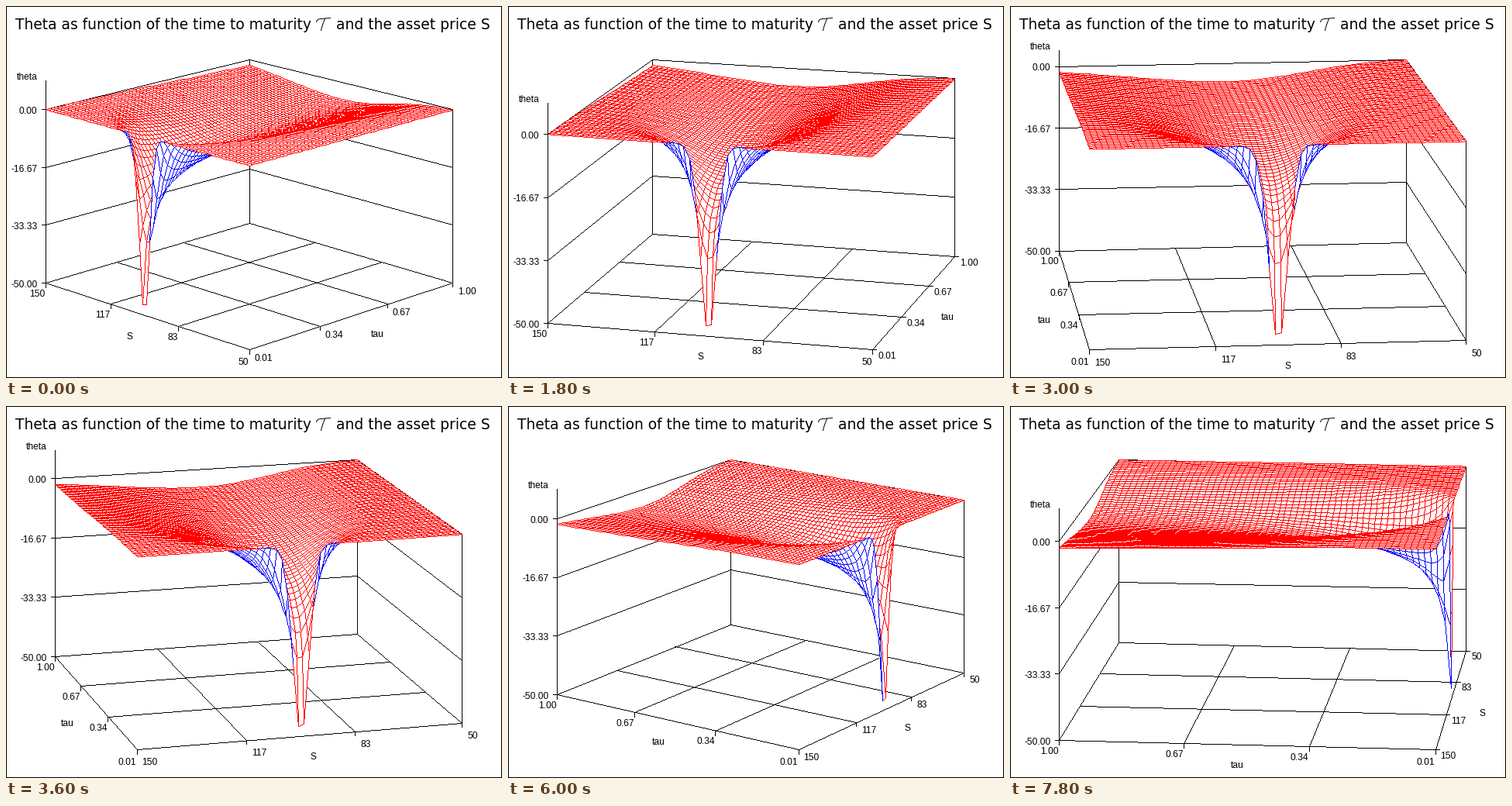
Write a matplotlib script that moves like this. It is 640 px wide and 480 px high and loops after 8 s.

```python
import numpy as np
import matplotlib.pyplot as plt
from matplotlib.animation import FuncAnimation

W, H, DPI = 640, 480, 100
PX = 72 / DPI                     # points per pixel
TOP, BOTTOM, SPAN = 69, 443, 525  # screen area the box is fitted to
DIST, HEIGHT = 12.1, 2.118        # viewer distance and box height
VOL, STRIKE, FLOOR = 0.25, 100, 50
POINTS = 60
VIEWS, HOLD = 14, 3               # viewing angles, ticks each one stays
RED, BLUE, WHITE, BLACK = (255, 0, 0), (0, 0, 255), (255, 255, 255), (0, 0, 0)

CORNERS = [(-.5, -.5), (-.5, .5), (.5, .5), (.5, -.5)]
THIRDS = np.linspace(-.5, .5, 4)
PRICES = ["150", "117", "83", "50"]
TIMES = ["1.00", "0.67", "0.34", "0.01"]
LEVELS = ["-50.00", "-33.33", "-16.67", "0.00"]


def option_theta(price, tau):
    sd = VOL * np.sqrt(tau)
    d1 = np.log(price / STRIKE) / sd + sd / 2
    density = np.exp(-d1 ** 2 / 2) / np.sqrt(2 * np.pi)
    return -price * VOL * density / (2 * np.sqrt(tau))


axis = np.linspace(-.5, .5, POINTS)
GS, GT = np.meshgrid(axis, axis, indexing="ij")
GZ = option_theta(100 - 100 * GS, .01 + .99 * (.5 - GT)) / FLOOR + .5


# --- projection ---

def depth(s, t, angle):
    a = np.radians(angle)
    return s * np.sin(a) + t * np.cos(a)


def make_projection(angle, left):
    """Perspective view of the unit box, stretched to the plot area."""
    mid = 90 * np.floor(angle / 90) + 45
    turn = np.radians(mid + .946 * (angle - mid))

    def raw(s, t, z):
        near = depth(s, t, angle)
        x = s * np.cos(turn) - t * np.sin(turn)
        return x / (DIST - near), (near - z * HEIGHT) / (DIST - near)

    pts = np.array([raw(s, t, z) for s, t in CORNERS for z in (-.5, .5)])
    (x0, y0), (x1, y1) = pts.min(axis=0), pts.max(axis=0)

    def project(s, t, z):
        x, y = raw(s, t, z)
        return np.stack([left + SPAN * (x - x0) / (x1 - x0),
                         TOP + (BOTTOM - TOP) * (y - y0) / (y1 - y0)], axis=-1)
    return project


def slope(p, q):
    dx, dy = np.abs(q - p)
    return np.degrees(np.arctan2(dy, dx))


# --- hard-edged drawing, one pixel wide ---

def to_pixels(pts):
    return np.floor(np.asarray(pts) + .5).astype(int)


def spread(counts):
    """Owner of each sample, and its running index within that owner."""
    owner = np.repeat(np.arange(len(counts)), counts)
    return owner, np.arange(len(owner)) - np.repeat(np.cumsum(counts) - counts, counts)


def line_pixels(start, end):
    start, end = to_pixels(start), to_pixels(end)
    steps = np.abs(end - start).max(axis=1)
    owner, index = spread(steps + 1)
    part = (index / np.maximum(steps, 1)[owner])[:, None]
    return to_pixels(start[owner] + (end - start)[owner] * part), owner


def cell_pixels(cells):
    a, b, c, d = cells.transpose(1, 0, 2)

    def samples(e1, e2):
        size = np.abs(np.stack([e1, e2])).max(axis=(0, 2))
        return np.ceil(1.5 * size).astype(int) + 1

    nu, nv = samples(b - a, c - d), samples(d - a, c - b)
    owner, index = spread(nu * nv)
    u = ((index % nu[owner] + .5) / nu[owner])[:, None]
    v = ((index // nu[owner] + .5) / nv[owner])[:, None]
    near, far = a[owner] + (b - a)[owner] * u, d[owner] + (c - d)[owner] * u
    return to_pixels(near + (far - near) * v), owner


def paint(canvas, pixels, color):
    canvas[pixels[:, 1], pixels[:, 0]] = color


def paint_surface(canvas, project, angle):
    """Paint the mesh from back to front; its underside is blue."""
    grid = to_pixels(project(GS, GT, GZ))
    cells = np.stack([grid[:-1, :-1], grid[1:, :-1],
                      grid[1:, 1:], grid[:-1, 1:]], axis=2).reshape(-1, 4, 2)
    near = depth(GS, GT, angle)
    cells = cells[np.argsort((near[:-1, :-1] + near[1:, 1:]).ravel(), kind="stable")]

    d1, d2 = cells[:, 2] - cells[:, 0], cells[:, 3] - cells[:, 1]
    upper = d1[:, 0] * d2[:, 1] - d1[:, 1] * d2[:, 0] >= 0
    ink = np.where(upper[:, None], RED, BLUE)

    fill, fill_cell = cell_pixels(cells)
    edge, edge_id = line_pixels(cells[:, [0, 3, 0, 1]].reshape(-1, 2),
                                cells[:, [1, 2, 3, 2]].reshape(-1, 2))
    edge_cell = edge_id // 4
    order = np.argsort(np.concatenate([2 * fill_cell, 2 * edge_cell + 1]), kind="stable")
    color = np.concatenate([np.full((len(fill), 3), WHITE), ink[edge_cell]])
    paint(canvas, np.concatenate([fill, edge])[order], color[order])


# --- one view of the plot ---

def render(step):
    """Return the picture and its labels as (text, x, y, alignment)."""
    angle = 45 - 10 * step
    price_left = angle > 0
    project = make_projection(angle, 51 if price_left else 63)
    k = 1 if price_left else 0
    left, front, right, back = [np.array(CORNERS[(k + n) % 4]) for n in range(4)]
    lines, labels = [], []

    def at(corner, z):
        return project(corner[0], corner[1], z)

    # floor grid and walls
    for c in THIRDS:
        lines.append((project(c, -.5, -.5), project(c, .5, -.5)))
        lines.append((project(-.5, c, -.5), project(.5, c, -.5)))
        lines.append((at(left, c), at(back, c)))
        lines.append((at(back, c), at(right, c)))
    lines += [(at(c, -.5), at(c, .5)) for c in (left, back, right)]

    # vertical axis
    x, low = at(left, -.5)
    high = at(left, .5)[1]
    tip = max(high - (low - high) / 6, 57)
    lines.append(((x, high), (x, tip)))
    labels.append(("theta", x - 11, tip - 6, "right"))
    for z, text in zip(THIRDS, LEVELS):
        y = at(left, z)[1]
        lines.append(((x - 5, y), (x, y)))
        labels.append((text, x - 11, y + 1, "right"))

    # left floor axis
    names, title = (PRICES, "S") if price_left else (TIMES, "tau")
    tilt = slope(at(left, -.5), at(front, -.5))
    for n, text in enumerate(names):
        x, y = at(left + (front - left) * n / 3, -.5)
        lines.append(((x, y), (x, y + 6)))
        labels.append((text, x - 1, y + (15 if n == 3 else 13), "right"))
    x, y = (at(left, -.5) + at(front, -.5)) / 2
    labels.append((title, x - 31 + 28 * np.exp(-tilt / 20), y + 25, "right"))

    # right floor axis
    names, title = (TIMES[::-1], "tau") if price_left else (PRICES, "S")
    tilt = slope(at(front, -.5), at(right, -.5))
    dx, dy = (5, 0) if tilt > 45 else (0, 5)
    for n, text in enumerate(names):
        x, y = at(front + (right - front) * n / 3, -.5)
        lines.append(((x, y), (x + dx, y + dy)))
        labels.append((text, x + 6.5, y + 6.5 + 11 * np.exp(-tilt / 16), "left"))
    x, y = (at(front, -.5) + at(right, -.5)) / 2
    labels.append((title, x + 37 - 30 * np.exp(-tilt / 18),
                   y + 14 + 13 * np.exp(-tilt / 35), "left"))

    canvas = np.full((H, W, 3), WHITE, dtype=np.uint8)
    canvas[[0, -1], :] = BLACK
    canvas[:, [0, -1]] = BLACK
    ends = np.array(lines)
    paint(canvas, line_pixels(ends[:, 0], ends[:, 1])[0], BLACK)
    paint_surface(canvas, project, angle)
    return canvas, labels


views = [render(step) for step in range(VIEWS)]

fig = plt.figure(figsize=(W / DPI, H / DPI), dpi=DPI, facecolor="white")
ax = fig.add_axes([0, 0, 1, 1])
ax.axis("off")
picture = ax.imshow(views[0][0], aspect="auto", interpolation="nearest",
                    extent=(-.5, W - .5, H - .5, -.5))
ax.set_xlim(-.5, W - .5)
ax.set_ylim(H - .5, -.5)

# title with a script tau between its two halves
TITLE = dict(family="DejaVu Sans", va="baseline", ha="left")
ax.text(12, 30, "Theta as function of the time to maturity", size=18.6 * PX, **TITLE)
ax.text(425, 30, "and the asset price S", size=18.8 * PX, **TITLE)
for xs, ys in (([400, 401, 403, 406, 418], [20, 18, 16.5, 16, 15]),
               ([411, 409, 407, 406], [16, 21, 27, 31])):
    ax.plot(xs, ys, color="black", lw=PX)

labels = [ax.text(0, 0, "", family="Liberation Sans", size=12 * PX, va="baseline")
          for _ in views[0][1]]


def draw(i):
    canvas, texts = views[i // HOLD]
    picture.set_data(canvas)
    for label, (text, x, y, align) in zip(labels, texts):
        label.set_text(text)
        label.set_position((x, y + 4.4))
        label.set_ha(align)
    return [picture, *labels]


anim = FuncAnimation(fig, draw, frames=40, interval=200, repeat=True,
                     cache_frame_data=False)
plt.show()
```
